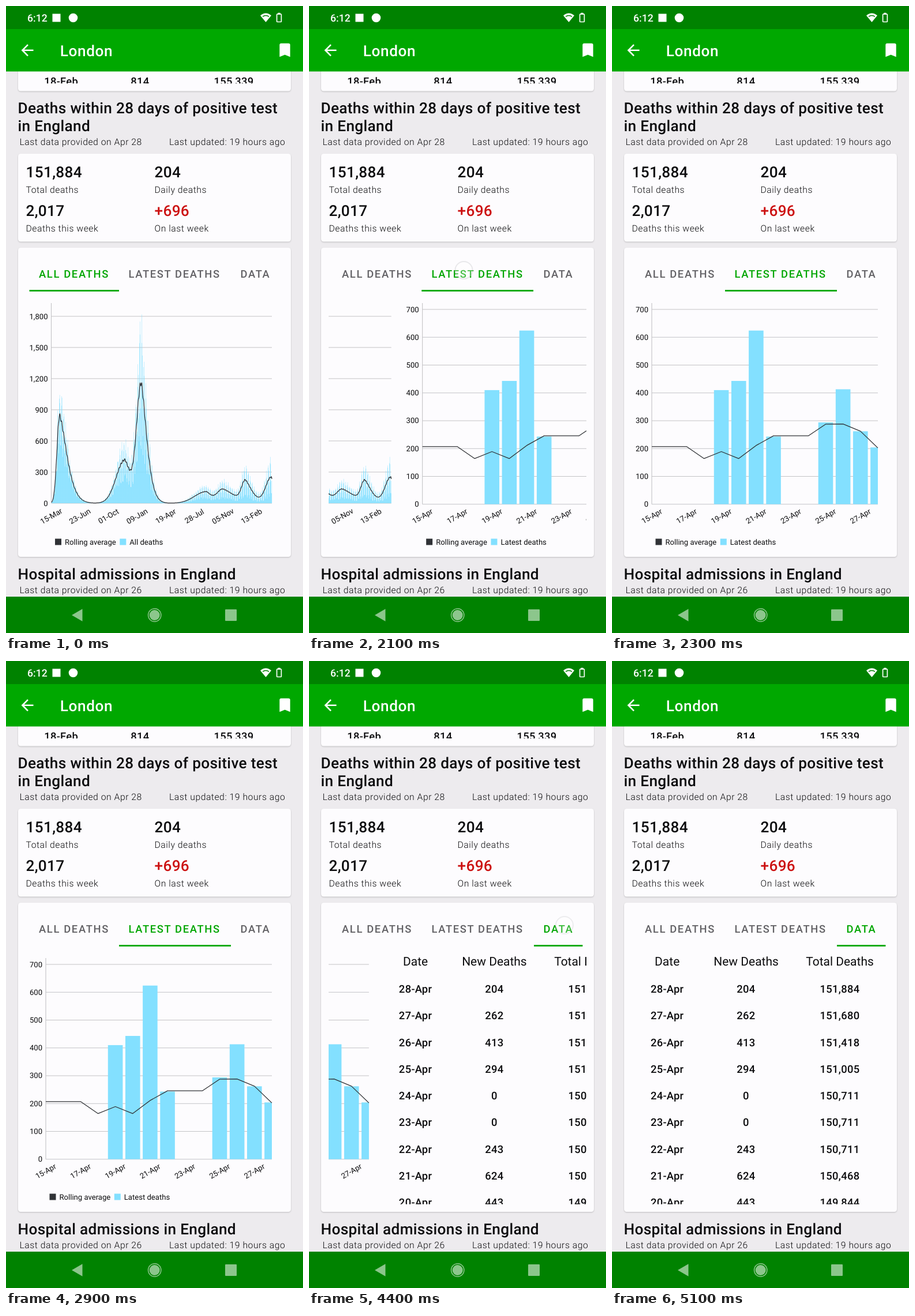
Write an HTML page that moves like this. It is 515x1087 px and loops after 5.2 s.

```html
<!DOCTYPE html>
<html lang="en">
<head>
<meta charset="utf-8">
<title>Deaths by tab</title>
<style>
  html, body { margin: 0; width: 100%; height: 100%; overflow: hidden; background: #edebee; }
  svg { display: block; }
  text { font-family: Roboto, sans-serif; fill: #0c0c0e; white-space: pre; text-rendering: geometricPrecision; }
  .head { font-size: 26.2px; font-weight: 500; letter-spacing: .0125em; }
  .note { font-size: 15.74px; font-weight: 300; letter-spacing: .0333em; }
  .tab { font-size: 18.36px; font-weight: 500; letter-spacing: .0893em; }
  .column { font-size: 20.98px; text-anchor: middle; }
  .cell { font-size: 18.36px; font-weight: 500; letter-spacing: .0179em; text-anchor: middle; }
  .small { font-size: 13.1px; }
  .right { text-anchor: end; }
  .middle { text-anchor: middle; }
  .card { fill: #fdfcfe; filter: drop-shadow(0 1px 1px #0003); }
  .grid { stroke: #c3c3c6; stroke-width: 1.1; fill: none; }
  .bars { fill: #83e0ff; }
  .average { stroke: #303236; stroke-width: 1.25; fill: none; stroke-linejoin: round; }
</style>
</head>
<body>
<svg width="515" height="1087" viewBox="0 0 515 1087">
  <defs>
    <clipPath id="pager"><rect x="34" y="503" width="447" height="438.7"/></clipPath>
    <clipPath id="previous"><rect x="21" y="113" width="473" height="21.3"/></clipPath>
  </defs>
  <rect width="515" height="1087" fill="#edebee"/>
  <rect class="card" x="21" y="90" width="473" height="57.5" rx="4.5"/>
  <rect class="card" x="21" y="256" width="473" height="152.5" rx="4.5"/>
  <rect class="card" x="21" y="419" width="473" height="536" rx="4.5"/>
  <g id="previousRow" clip-path="url(#previous)"></g>
  <g id="labels"></g>
  <g id="tabs"></g>
  <rect id="indicator" y="492.2" height="2.7" fill="#00a600"/>
  <g clip-path="url(#pager)"><g id="page0"></g><g id="page1"></g><g id="page2"></g></g>
  <circle id="touch" cy="458" r="15" fill="#fff" fill-opacity=".65" stroke="#cfcfd2" stroke-width="2"/>

  <rect width="515" height="40" fill="#008200"/>
  <rect y="40" width="515" height="73.5" fill="#00a800"/>
  <g fill="#fff">
    <text x="37" y="27" style="font-size:17.6px;font-weight:500;fill:#fff">6:12</text>
    <rect x="80.5" y="13.5" width="14" height="14"/>
    <circle cx="116.5" cy="20.5" r="7.8"/>
    <path d="M441 16.6Q450.5 8.6 460 16.6L450.5 28Z"/>
    <path d="M445 18.4Q450.5 14.6 456 18.4" fill="none" stroke="#008200" stroke-width="1.4"/>
    <path d="M471.3 11.8h4.4v2h-4.4z"/>
    <rect x="469.6" y="14.1" width="7.8" height="13.4" rx="1" fill="none" stroke="#fff" stroke-width="1.7"/>
    <path transform="translate(21.3 61) scale(1.3115)" d="M20 11H7.83l5.59-5.59L12 4l-8 8 8 8 1.41-1.41L7.83 13H20z"/>
    <path transform="translate(467.8 60.8) scale(1.3115)" d="M17 3H7c-1.1 0-2 .9-2 2V21l7-3 7 3V5c0-1.1-.9-2-2-2z"/>
    <text class="head" x="93.8" y="87" style="fill:#fff;letter-spacing:.022em">London</text>
  </g>
  <rect y="1024" width="515" height="63" fill="#008200"/>
  <g fill="#8cc68c">
    <path d="M114 1056L132.5 1045.3V1066.7Z"/>
    <circle cx="257.7" cy="1056" r="9"/>
    <circle cx="257.7" cy="1056" r="11.2" fill="none" stroke="#8cc68c" stroke-width="1.4"/>
    <rect x="380" y="1046" width="20" height="20" rx="1"/>
  </g>
</svg>
<script>
const $ = id => document.getElementById(id);
const text = (kind, x, y, value, extra = '') => `<text class="${kind}" x="${x}" y="${y}" ${extra}>${value}</text>`;
const comma = n => n.toLocaleString('en-US');
const clamp = v => Math.max(0, Math.min(1, v));
const range = (count, make) => Array.from({ length: count }, (_, i) => make(i));

function dateLabel(year, month, day) {
  const [, name, number] = new Date(year, month - 1, day).toDateString().split(' ');
  return `${number}-${name}`;
}

// Page text
const source = (y, day) => text('note', 23.5, y, `Last data provided on Apr ${day}`)
  + text('note', 283, y, 'Last updated: 19 hours ago');
const stat = (x, y, value, label, color = '#0c0c0e') =>
  text('head', x, y, value, `style="fill:${color}"`) + text('note', x, y + 27, label);
$('labels').innerHTML =
  text('head', 20.5, 186, 'Deaths within 28 days of positive test') + text('head', 20.5, 217, 'in England')
  + source(241, 28)
  + stat(34.5, 297, '151,884', 'Total deaths') + stat(257.5, 297, '204', 'Daily deaths')
  + stat(34.5, 364, '2,017', 'Deaths this week') + stat(257.5, 364, '+696', 'On last week', '#cc1111')
  + text('head', 20.5, 994, 'Hospital admissions in England') + source(1018, 26);

const columns = [95.7, 232.5, 395];
const tableRow = (kind, y, values) => values.map((v, i) => text(kind, columns[i], y, v)).join('');
$('previousRow').innerHTML = tableRow('cell', 137.3, ['18-Feb', '814', '155,339']);

// Charts
function frame({ left, bottom, step, unit, count, dateStep, dates }) {
  let lines = `M${left} 515V${bottom}`, out = '';
  for (let i = 0; i <= count; i++) {
    const y = bottom - i * step;
    lines += `M${left} ${y}H461`;
    out += text('small right', left - 6, y + 4.5, comma(i * unit));
  }
  dates.forEach((date, i) => {
    const x = left + i * dateStep;
    out += text('small middle', x, 889, date, `transform="rotate(-30 ${x} 884.5)"`);
  });
  return `<path class="grid" d="${lines}"/>` + out;
}
const legend = (x, name) => `<rect x="${x}" y="923.5" width="11" height="11" fill="#303236"/>`
  + text('small', x + 17, 934.3, 'Rolling average')
  + `<rect class="bars" x="${x + 112.3}" y="923.5" width="11" height="11"/>`
  + text('small', x + 129.3, 934.3, name);
const line = points => `<polyline class="average" points="${points.join(' ')}"/>`;

// Each wave climbs like a bell curve and fades more slowly
const waves = [
  { peak: 93, height: 152, rise: 6.6, fall: 17.9 },
  { peak: 206, height: 75, rise: 21, fall: 15 },
  { peak: 234.5, height: 203, rise: 11.3, fall: 13.7 },
  { peak: 347, height: 20, rise: 28, fall: 13 },
  { peak: 376, height: 24, rise: 14, fall: 30 },
  { peak: 415, height: 35, rise: 9, fall: 16 },
  { peak: 460, height: 45, rise: 13.5, fall: 5 },
];
const averageAt = x => waves.reduce((sum, { peak, height, rise, fall }) => {
  const decay = x < peak ? ((peak - x) / rise) ** 2 : ((x - peak) / fall) ** 1.5;
  return sum + height * Math.exp(-decay);
}, 0) * (1 + .025 * Math.sin(x * 1.9));

// Reporting dips every weekend, more strongly as time goes on
function dailyBar(day) {
  const x = 79 + day * .497;
  const weekly = (.3 + day * .0006) * Math.cos(day * 2 * Math.PI / 7);
  const noise = .1 * Math.sin(day * day);
  return `M${x.toFixed(2)} 862v${(-averageAt(x) * (1 + weekly + noise)).toFixed(1)}h.44V862z`;
}
$('page0').innerHTML = frame({
    left: 78.5, bottom: 862, step: 54, unit: 300, count: 6, dateStep: 49.6,
    dates: range(8, i => dateLabel(2020, 3, 15 + i * 100)) })
  + `<path class="bars" d="${range(769, dailyBar).join('')}"/>`
  + line(range(765, i => 79 + i / 2).map(x => [x, 862 - averageAt(x)]))
  + legend(85, 'All deaths');

// Daily deaths from 9 to 28 April; the chart starts on the 15th
const deaths = [0, 0, 301, 235, 618, 295, 0, 0, 0, 0, 410, 443, 624, 243, 0, 0, 294, 413, 262, 204];
const shown = deaths.slice(6);
const weekAverage = i => deaths.slice(i, i + 7).reduce((a, b) => a + b) / 7;
const dayX = i => 69 + i * 30.15, countY = n => 863.7 - n * .4824;
const latestBars = shown.map((n, i) => {
  const x = dayX(i) - 12.8;
  return `<rect x="${x}" y="${countY(n)}" width="${Math.min(25.6, 461 - x)}" height="${n * .4824}"/>`;
}).join('');
$('page1').innerHTML = frame({
    left: 69, bottom: 863.7, step: 48.24, unit: 100, count: 7, dateStep: 60.3,
    dates: range(7, i => dateLabel(2022, 4, 15 + i * 2)) })
  + `<g class="bars">${latestBars}</g>`
  + line(shown.map((_, i) => [dayX(i), countY(weekAverage(i))]))
  + legend(75.5, 'Latest deaths');

// Data table, newest day first
let total = 151884, table = tableRow('column', 528, ['Date', 'New Deaths', 'Total Deaths']);
for (let i = 0; i < 9; i++) {
  const n = deaths.at(-1 - i);
  table += tableRow('cell', 575.2 + i * 46.25, [dateLabel(2022, 4, 28 - i), n, comma(total)]);
  total -= n;
}
$('page2').innerHTML = table;

// Tabs and motion
const edges = [40.5, 196, 390, 474.5];
$('tabs').innerHTML = ['ALL DEATHS', 'LATEST DEATHS', 'DATA']
  .map((name, i) => text('tab', edges[i] + 16.5, 471, name)).join('');
const taps = [{ down: 1700, up: 2007, x: 268.5 }, { down: 4200, up: 4289.3, x: 443 }];
const pageWidth = 446;
const easeOut = v => 1 - (1 - clamp(v)) ** 2;
function edgeAt(position) {
  const i = Math.floor(position), next = edges[i + 1] ?? edges[i];
  return edges[i] + (position - i) * (next - edges[i]);
}

function draw(now) {
  const t = Math.floor(now % 5200 / 100) * 100;   // the screen refreshes every 100 ms
  const progress = duration => taps.reduce((sum, tap) => sum + easeOut((t - tap.up) / duration), 0);
  const page = progress(200), selected = progress(100);

  for (let i = 0; i < 3; i++) {
    $('page' + i).setAttribute('transform', `translate(${(i - page) * pageWidth} 0)`);
    $('tabs').children[i].style.fill = i === Math.round(selected) ? '#00a600' : '#626165';
  }
  const left = edgeAt(selected);
  $('indicator').setAttribute('x', left);
  $('indicator').setAttribute('width', edgeAt(selected + 1) - left);

  const tap = taps.find(tap => t >= tap.down && t < tap.up + 210);
  $('touch').setAttribute('cx', tap ? tap.x : 0);
  $('touch').setAttribute('opacity', tap ? clamp(1 - (t - tap.up) / 210) ** 1.4 : 0);
  requestAnimationFrame(draw);
}
draw(0);
</script>
</body>
</html>
```
